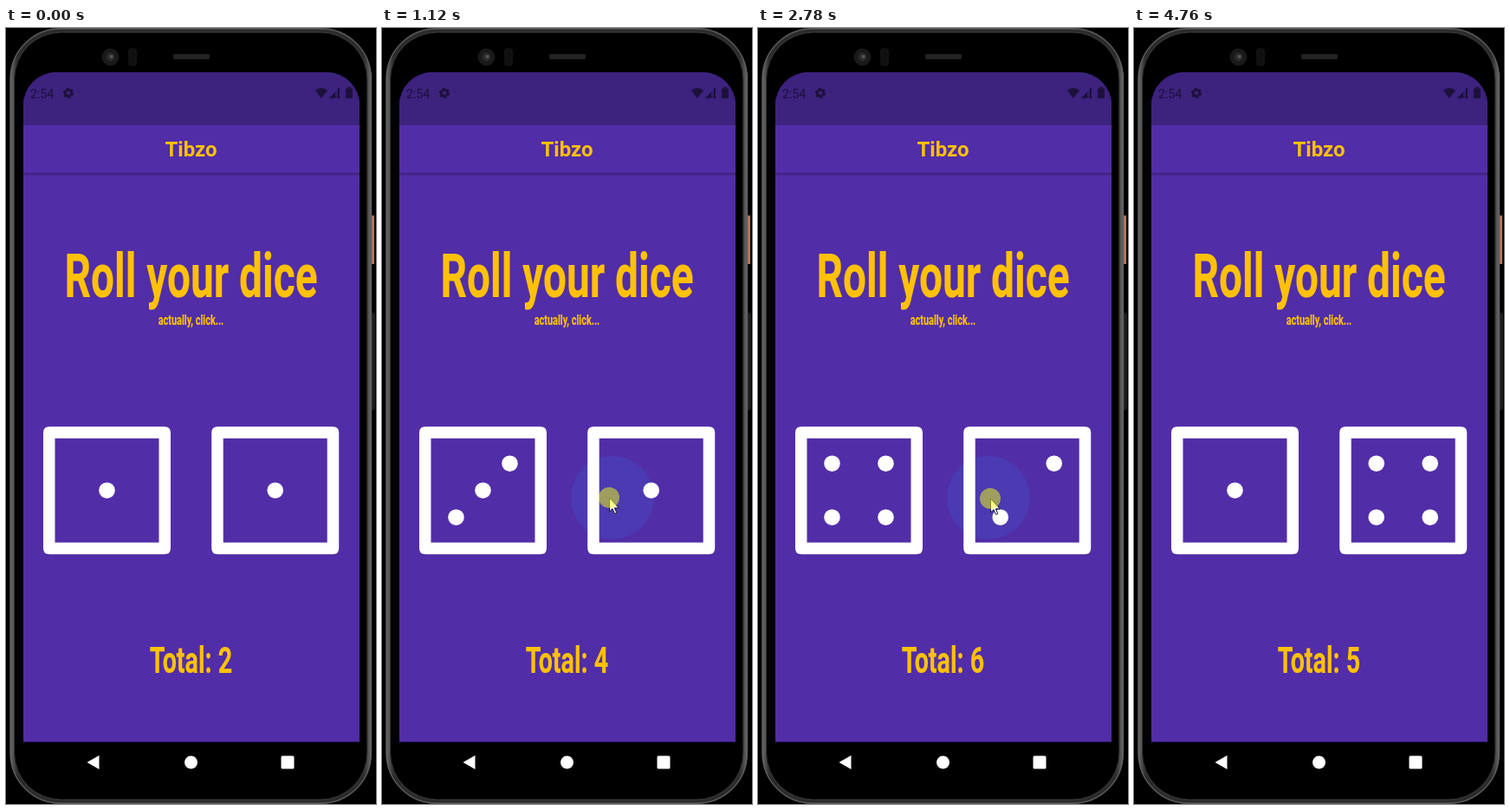
Recreate the animation shown at these times as an HTML page. Size 427 px wide and 894 px high, loop 5.36 s.

```html
<!DOCTYPE html>
<html lang="en">
<head>
<meta charset="utf-8">
<title>Dice roller</title>
<style>
  html, body { margin: 0; width: 100%; height: 100%; overflow: hidden; background: #000; }
  svg { display: block; width: 100%; height: 100%; }
  text { font-family: Roboto, "Liberation Sans", sans-serif; }
  .gold { fill: #ffc107; font-weight: 700; text-anchor: middle; }
  .narrow { stroke: #ffc107; stroke-width: .012em; }
</style>
</head>
<body>
<svg viewBox="0 0 427 894">
  <defs>
    <linearGradient id="shade" x2="0" y2="1">
      <stop offset="0" stop-opacity=".3"/>
      <stop offset="1" stop-opacity="0"/>
    </linearGradient>
    <linearGradient id="rim">
      <stop offset="0" stop-color="#6a6a6a"/>
      <stop offset=".02" stop-color="#2c2c2c"/>
      <stop offset=".98" stop-color="#2c2c2c"/>
      <stop offset="1" stop-color="#6a6a6a"/>
    </linearGradient>
    <clipPath id="screen"><rect x="20" y="51" width="388" height="819" rx="38"/></clipPath>
    <clipPath id="button"><rect x="214" y="436" width="194" height="193"/></clipPath>
  </defs>

  <!-- phone body -->
  <rect width="427" height="894"/>
  <rect x="420" y="216" width="5" height="56" rx="1" fill="#b9775a"/>
  <rect x="420" y="328" width="6" height="112" rx="2" fill="#1c1c1c"/>
  <rect x="5" y=".7" width="416.500" height="892.500" rx="58" fill="url(#rim)" stroke="#5c5c5c" stroke-width="1.4"/>
  <rect x="9.500" y="5" width="407.500" height="884" rx="54" stroke="#3c3c3c"/>
  <rect x="193" y="30" width="42" height="6" rx="2" fill="#242424"/>
  <circle cx="120.500" cy="33.500" r="10" fill="#191919"/>
  <circle cx="120.500" cy="33.500" r="5" fill="#2b2b2b"/>
  <circle cx="121.500" cy="33" r="2" fill="#555"/>
  <rect x="141" y="23" width="10" height="21" rx="4" fill="#111"/>

  <!-- app screen -->
  <g clip-path="url(#screen)">
    <rect x="20" y="51" width="388" height="771.500" fill="#512da8"/>
    <rect x="20" y="51" width="388" height="61" fill="#3d227e"/>
    <rect x="20" y="167" width="388" height="4" fill="url(#shade)"/>
  </g>
  <g fill="#1d113c">
    <text x="28" y="80.500" font-size="14">2:54</text>
    <g fill="none" stroke="#1d113c">
      <circle cx="72" cy="75" r="3.700" stroke-width="2.800"/>
      <circle cx="72" cy="75" r="5.200" stroke-width="2" stroke-dasharray="2.700 2.745"/>
    </g>
    <path d="M357 72q7-6 14 0l-7 9z"/>
    <path d="M385 69v12h-12z" fill-opacity=".4"/>
    <path d="M380 74v7h-7zM383 69h2v12h-2z"/>
    <path d="M394 68h4v1.500h2v11.500h-8v-11.500h2z"/>
  </g>
  <text class="gold" x="213.500" y="148" font-size="24">Tibzo</text>

  <!-- condensed display face -->
  <g class="gold narrow" transform="translate(213.500 0) scale(.683 1)">
    <text y="310" font-size="70">Roll your dice</text>
    <text y="342" font-size="16">actually, click...</text>
    <text id="total" y="743" font-size="42"></text>
  </g>

  <circle id="splash" cx="266" cy="541" fill="#2196f3" clip-path="url(#button)"/>
  <g fill="#fff">
    <path id="left" transform="translate(116.500 532.700)" fill-rule="evenodd"/>
    <path id="right" transform="translate(310.700 532.700)" fill-rule="evenodd"/>
    <path d="M93.500 846L107.500 838v16z"/>
    <circle cx="213.500" cy="846" r="7.500"/>
    <rect x="317.500" y="838.500" width="15" height="15" rx="1.500"/>
  </g>
  <path id="cursor" d="M.5.5v15.500l3.500-3.200 2.500 5.700 2.300-1-2.500-5.600h5z" fill="#fff" stroke="#1a1a1a"/>
  <circle id="touch" r="12" fill="#f6ff0e" fill-opacity=".5"/>
</svg>
<script>
const LOOP = 5360, TICK = 66.15;
const $ = id => document.getElementById(id);

// One tap each, in ticks; a die in `late` stays blank until `shown`.
const taps = [
  { press: -9, up: -9, dice: [1, 1] },
  { press: 10, up: 11, dice: [3, 1], late: 0, shown: 13 },
  { press: 15, up: 18, dice: [3, 2], late: 1, shown: 19 },
  { press: 21, up: 23, dice: [1, 6], late: 1, shown: 25 },
  { press: 28, up: 30, dice: [6, 3] },
  { press: 33, up: 35, dice: [4, 2], late: 0, shown: 36 },
  { press: 40, up: 43, dice: [2, 4] },
  { press: 53, up: 55, dice: [6, 5], late: 1, shown: 58 },
  { press: 63, up: 65, dice: [1, 4] }
];

const dot = (x, y) => `M${x * 31 - 9.3} ${y * 31}a9.3 9.3 0 1 0 18.6 0a9.3 9.3 0 1 0-18.6 0z`;
const frame = "M-66.500-73.500h133q7 0 7 7v133q0 7-7 7h-133q-7 0-7-7v-133q0-7 7-7zM-60-60v120h120v-120z";

function face(n) {
  let d = frame;
  if (n % 2) d += dot(0, 0);
  if (n > 1) d += dot(1, -1) + dot(-1, 1);
  if (n > 3) d += dot(-1, -1) + dot(1, 1);
  if (n > 5) d += dot(-1, 0) + dot(1, 0);
  return d;
}

const clamp = v => Math.min(1, Math.max(0, v));
const mix = (a, b, k) => a.map((v, i) => v + (b[i] - v) * k);
const ENTER = [355, 825], FIRST = [262, 541], REST = [268, 542], LEAVE = [317, 681];

function pointer(n) {
  if (n < 25) return mix(ENTER, FIRST, 1 - (1 - clamp((n - 2) / 7)) ** 2);
  if (n < 66) return mix(FIRST, REST, clamp((n - 24) / 3));
  return mix(REST, LEAVE, clamp((n - 65) / 6) ** 2);
}

function splash(n, tap) {
  if (tap.up - tap.press < 2) return [0, 0];
  if (n >= tap.up) return [220, .14 * clamp(1 - (n - tap.up) / 3)];
  return [48 * clamp((n - tap.press - 1)), .12];
}

function draw(ms) {
  const n = Math.floor((ms % LOOP + 10) / TICK);
  const rolled = taps.filter(t => t.up <= n).pop();
  const tap = taps.filter(t => t.press <= n).pop();

  ["left", "right"].forEach((id, i) => {
    const blank = rolled.late === i && n < rolled.shown;
    $(id).setAttribute("d", blank ? "" : face(rolled.dice[i]));
  });
  $("total").textContent = "Total: " + (rolled.dice[0] + rolled.dice[1]);

  const at = `translate(${pointer(n)})`;
  $("cursor").setAttribute("transform", at);
  $("cursor").style.display = n >= 2 && n < 72 ? "" : "none";
  $("touch").setAttribute("transform", at);
  $("touch").style.display = n < tap.up ? "" : "none";

  const [r, alpha] = splash(n, tap);
  $("splash").setAttribute("r", r);
  $("splash").setAttribute("fill-opacity", alpha);
}

const start = performance.now();
function loop() {
  draw(performance.now() - start);
  requestAnimationFrame(loop);
}
draw(0);
loop();
</script>
</body>
</html>
```
